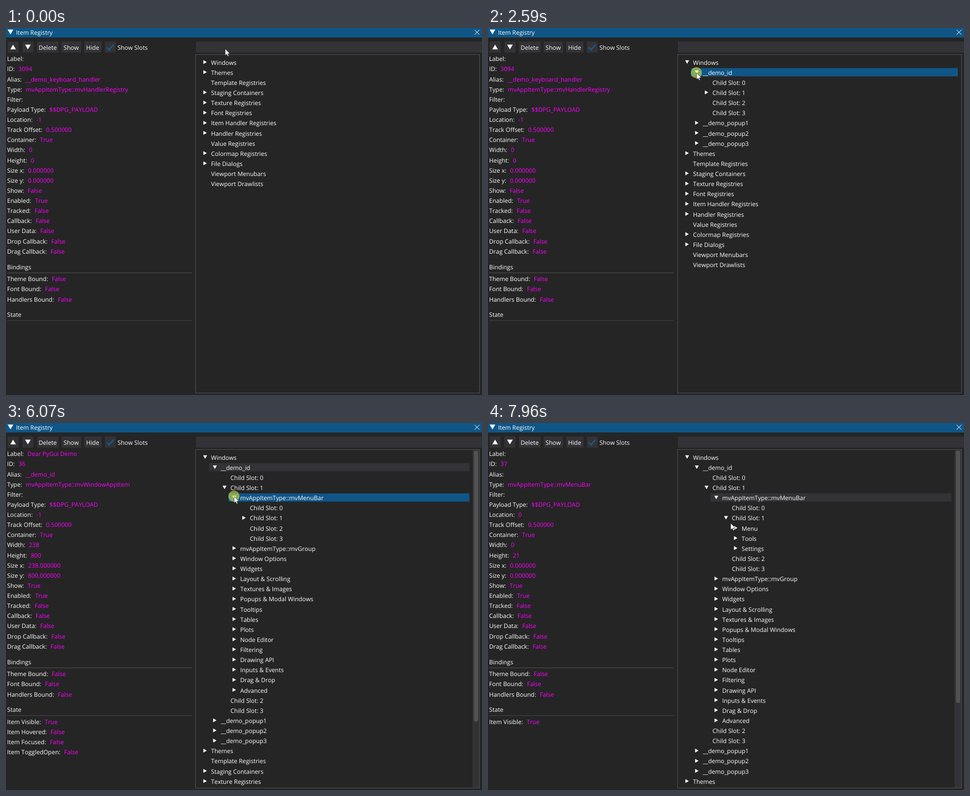
An HTML page with a canvas that plays this animation: 852 by 657 pixels, repeating every 7.99 s.

```html
<!DOCTYPE html>
<html>
<head>
<meta charset="utf-8">
<style>
  html, body { margin: 0; width: 100%; height: 100%; overflow: hidden; background: #252525; }
  canvas { display: block; }
</style>
</head>
<body>
<canvas id="stage" width="852" height="657"></canvas>
<script>
const ctx = document.getElementById('stage').getContext('2d');
const LOOP = 7990, ROW = 18.125, INDENT = 17.4, LINE_HEIGHT = 14.67, FRAME_HEIGHT = 19.85;
const COLOR = {
  bg: '#252525', title: '#0f5687', frame: '#333337', line: '#4e4e4e', text: '#fff', value: '#f0f',
  hover: '#225375', active: '#0f5687', check: '#145c8e', track: '#333337', grab: '#525255'
};

// [press, release] times of the mouse button
const clicks = [[1070, 1160], [2590, 2720], [4040, 4130], [6070, 6200], [7160, 7260]];

// [start, end, x, y]: cursor travels to x, y between start and end
const moves = [
  [0, 630, 357, 58], [800, 820, 357, 59], [1820, 2450, 373, 80], [3170, 3650, 392, 110],
  [3820, 3880, 392, 113], [5240, 5870, 408, 131], [6420, 6930, 425, 170], [7790, 7960, 434, 179]
];

// Tree nodes: a leaf has no kids, a closed node has an endless opening time
const leaf = label => ({ label });
const closed = label => ({ label, kids: [], openAt: Infinity });
const branch = (label, click, kids) => ({ label, kids, openAt: clicks[click][0] });
const slots = (click, kids) => [
  leaf('Child Slot: 0'), branch('Child Slot: 1', click, kids), leaf('Child Slot: 2'), leaf('Child Slot: 3')
];

const menuBar = branch('mvAppItemType::mvMenuBar', 3, slots(4, ['Menu', 'Tools', 'Settings'].map(closed)));
const demo = branch('__demo_id', 1, slots(2, [
  menuBar,
  ...['mvAppItemType::mvGroup', 'Window Options', 'Widgets', 'Layout & Scrolling', 'Textures & Images',
    'Popups & Modal Windows', 'Tooltips', 'Tables', 'Plots', 'Node Editor', 'Filtering', 'Drawing API',
    'Inputs & Events', 'Drag & Drop', 'Advanced'].map(closed)
]));
const tree = [
  branch('Windows', 0, [demo, ...['__demo_popup1', '__demo_popup2', '__demo_popup3'].map(closed)]),
  closed('Themes'), leaf('Template Registries'),
  ...['Staging Containers', 'Texture Registries', 'Font Registries', 'Item Handler Registries',
    'Handler Registries'].map(closed),
  leaf('Value Registries'), closed('Colormap Registries'), closed('File Dialogs'),
  leaf('Viewport Menubars'), leaf('Viewport Drawlists')
];

const items = [
  { from: 0, label: '', id: 3094, alias: '__demo_keyboard_handler', type: 'mvHandlerRegistry',
    location: -1, width: 0, height: 0, size: [0, 0], show: 'False', state: [] },
  { from: 2620, node: demo, label: 'Dear PyGui Demo', id: 36, alias: '__demo_id', type: 'mvWindowAppItem',
    location: -1, width: 238, height: 800, size: [238, 800], show: 'True',
    state: [['Item Visible', 'True'], ['Item Hovered', 'False'], ['Item Focused', 'False'],
      ['Item ToggledOpen', 'False']] },
  { from: 6100, node: menuBar, label: '', id: 37, alias: '', type: 'mvMenuBar',
    location: 0, width: 0, height: 21, size: [0, 0], show: 'True', state: [['Item Visible', 'True']] }
];

function rect(x, y, w, h, color, radius = 0) {
  ctx.fillStyle = color;
  ctx.beginPath();
  ctx.roundRect(x, y, w, h, radius);
  ctx.fill();
}

// Text placed by the vertical middle of its capitals
function text(str, x, middle, color = COLOR.text) {
  ctx.fillStyle = color;
  ctx.fillText(str, x, middle + 3.7);
}

function polygon(points, x, y) {
  ctx.beginPath();
  for (const [px, py] of points) ctx.lineTo(x + px, y + py);
  ctx.closePath();
}

function arrow(x, y, r, direction) {
  const a = 0.866 * r, b = 0.75 * r;
  const shapes = {
    up: [[0, -b], [a, b], [-a, b]],
    down: [[0, b], [a, -b], [-a, -b]],
    right: [[b, 0], [-b, -a], [-b, a]]
  };
  polygon(shapes[direction], x, y);
  ctx.fillStyle = COLOR.text;
  ctx.fill();
}

function stroke(points, color, width) {
  ctx.beginPath();
  for (const [x, y] of points) ctx.lineTo(x, y);
  ctx.strokeStyle = color;
  ctx.lineWidth = width;
  ctx.stroke();
}

function drawHeader() {
  rect(0, 0, 852, 17, COLOR.title);
  arrow(8, 7.2, 5.8, 'down');
  text('Item Registry', 18, 8);
  stroke([[838.8, 3.3], [847.4, 11.9]], COLOR.text, 1);
  stroke([[847.4, 3.3], [838.8, 11.9]], COLOR.text, 1);

  for (const [x, w] of [[3, 19.5], [29.5, 19.5], [55.5, 38.5], [99.5, 35], [140, 31], [177, 19.5], [340, 512]])
    rect(x, 24.2, w, FRAME_HEIGHT, COLOR.frame);
  arrow(12.7, 34, 5.8, 'up');
  arrow(39.2, 34, 5.8, 'down');
  text('Delete', 58.5, 35);
  text('Show', 103, 35);
  text('Hide', 143.5, 35);
  stroke([[180.5, 34.8], [184.5, 38.8], [192.5, 30]], COLOR.check, 2.6);
  text('Show Slots', 199.5, 35);
}

function drawFields(fields, y) {
  fields.forEach(([name, value], i) => {
    const label = name + ':', middle = y + i * ROW;
    text(label, 2, middle);
    text(String(value), 2 + ctx.measureText(label).width + 6.7, middle, COLOR.value);
  });
}

function drawSection(title, y, fields) {
  text(title, 2, y);
  rect(2.5, y + 9.75, 330.5, 0.9, COLOR.line);
  drawFields(fields, y + 21.6);
}

function drawDetails(item) {
  drawFields([
    ['Label', item.label], ['ID', item.id], ['Alias', item.alias], ['Type', 'mvAppItemType::' + item.type],
    ['Filter', ''], ['Payload Type', '$$DPG_PAYLOAD'], ['Location', item.location],
    ['Track Offset', '0.500000'], ['Container', 'True'], ['Width', item.width], ['Height', item.height],
    ['Size x', item.size[0].toFixed(6)], ['Size y', item.size[1].toFixed(6)], ['Show', item.show],
    ['Enabled', 'True'], ['Tracked', 'False'], ['Callback', 'False'], ['User Data', 'False'],
    ['Drop Callback', 'False'], ['Drag Callback', 'False']
  ], 55.6);
  drawSection('Bindings', 428, [['Theme Bound', 'False'], ['Font Bound', 'False'], ['Handlers Bound', 'False']]);
  drawSection('State', 513.7, item.state);
}

function visibleRows(nodes, t, level = 0) {
  return nodes.flatMap(node => [
    { node, level },
    ...(node.kids && t >= node.openAt ? visibleRows(node.kids, t, level + 1) : [])
  ]);
}

function drawTree(t, cursor, pressed, selected) {
  const rows = visibleRows(tree, t);
  const scrolls = rows.length > 33 && t >= clicks[2][0] + 30;
  const right = scrolls ? 829.5 : 841;

  ctx.strokeStyle = COLOR.line;
  ctx.lineWidth = 1;
  ctx.strokeRect(339.5, 47.5, 508, 606);
  ctx.save();
  ctx.beginPath();
  ctx.rect(340, 48, 507, 605);
  ctx.clip();
  rows.forEach(({ node, level }, i) => {
    const middle = 62 + i * ROW, top = middle - 8.4, shift = level * INDENT, left = 346 + shift;
    const hovered = cursor.x >= left && cursor.y >= top && cursor.y < top + LINE_HEIGHT;
    const fill = hovered ? (pressed ? COLOR.active : COLOR.hover) : node === selected && COLOR.frame;
    if (fill) rect(left, top, right - left, LINE_HEIGHT, fill);
    if (node.kids) arrow(356.4 + shift, top + LINE_HEIGHT / 2, 4.1, t >= node.openAt ? 'down' : 'right');
    text(node.label, 367 + shift, middle);
  });
  if (scrolls) {
    rect(835, 48, 12, 605, COLOR.track);
    rect(837.5, 49.5, 7.5, 19880 / rows.length, COLOR.grab, 3.5);
  }
  ctx.restore();
}

function cursorAt(t) {
  let x = 392, y = 37;
  for (const [start, end, toX, toY] of moves) {
    const u = Math.min(1, Math.max(0, (t - start) / (end - start)));
    const ease = (u + 3 * u * u - 2 * u * u * u) / 2;
    x += (toX - x) * ease;
    y += (toY - y) * ease;
  }
  return { x: Math.round(x), y: Math.round(y) };
}

function drawCursor({ x, y }, pressed) {
  if (pressed) {
    ctx.fillStyle = 'rgba(255, 255, 60, 0.5)';
    ctx.beginPath();
    ctx.arc(x, y, 10, 0, 2 * Math.PI);
    ctx.fill();
  }
  polygon([[0, 0], [0, 12], [2.8, 9.5], [4.6, 13.5], [6.5, 12.7], [4.8, 8.8], [8.5, 8.8]], x + 0.3, y + 0.3);
  ctx.fillStyle = '#fff';
  ctx.fill();
  ctx.strokeStyle = '#111';
  ctx.lineWidth = 0.6;
  ctx.stroke();
}

function draw(t) {
  const cursor = cursorAt(t);
  const pressed = clicks.some(([down, up]) => t >= down && t < up);
  const item = items.findLast(entry => t >= entry.from);
  rect(0, 0, 852, 657, COLOR.bg);
  ctx.font = '10.72px "Open Sans", sans-serif';
  ctx.fontKerning = 'none';
  ctx.textRendering = 'geometricPrecision';
  drawHeader();
  drawDetails(item);
  drawTree(t, cursor, pressed, item.node);
  drawCursor(cursor, pressed);
}

let begin;
function tick(now) {
  begin ??= now;
  draw((now - begin) % LOOP);
  requestAnimationFrame(tick);
}
requestAnimationFrame(tick);
</script>
</body>
</html>
```
